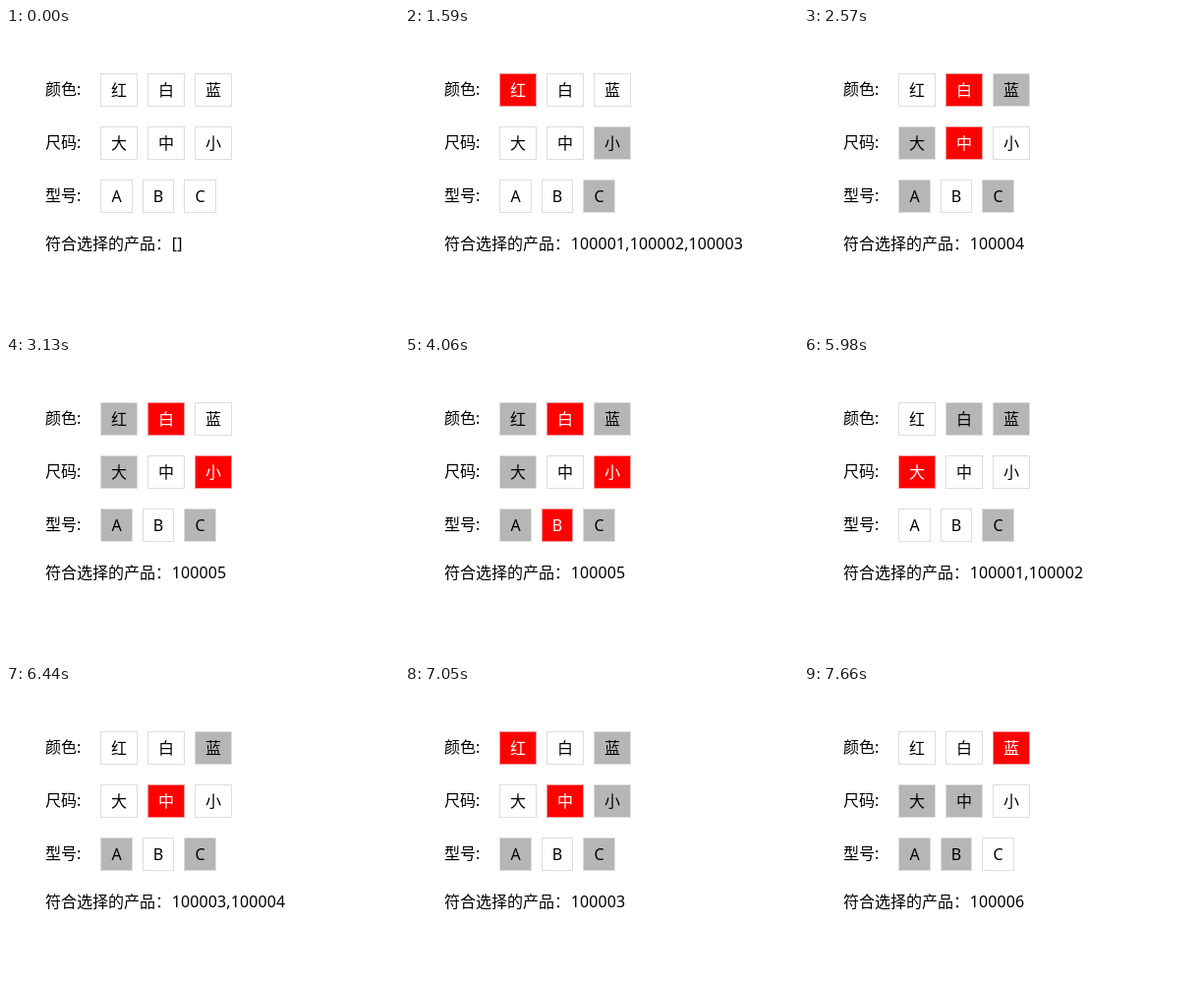
An HTML page that plays this animation: 400x306 px, repeating every 8.58 s.

```html
<!DOCTYPE html>
<html lang="zh-CN">
<head>
<meta charset="utf-8">
<title>规格选择</title>
<style>
  html, body { margin: 0; width: 100%; height: 100%; overflow: hidden; background: #fff; }
  svg { display: block; width: 400px; height: 306px; }
  text { font: 350 16px "Noto Sans", "Noto Sans CJK SC", sans-serif; fill: #000; }
  .option text { text-anchor: middle; }
  #result { letter-spacing: .1px; }
  rect { fill: #fff; stroke: #ddd; }
  .disabled rect { fill: #b6b6b6; }
  .selected rect { fill: #f00; stroke: #e99; }
  .selected text { fill: #fff; }
</style>
</head>
<body>
<svg id="stage" viewBox="0 0 400 306">
  <text x="40" y="225">符合选择的产品：</text>
  <text id="result" x="168.8" y="225">[]</text>
</svg>
<script>
const LOOP = 8580;
const groups = [
  { label: '颜色:', options: ['红', '白', '蓝'], widths: [38, 38, 38] },
  { label: '尺码:', options: ['大', '中', '小'], widths: [38, 38, 38] },
  { label: '型号:', options: ['A', 'B', 'C'], widths: [33, 32, 33] }
];
const products = ['红大A', '红大B', '红中B', '白中B', '白小B', '蓝小C']
  .map((specs, i) => ({ id: 100001 + i, specs: [...specs] }));
const clicks = [
  [1590, '红'], [2150, '白'], [2570, '中'], [3130, '小'], [4060, 'B'],
  [4580, '大'], [6350, '中'], [7000, '红'], [7610, '蓝']
];

const stage = document.getElementById('stage');
const result = document.getElementById('result');

function add(parent, tag, attrs, text = '') {
  const node = document.createElementNS('http://www.w3.org/2000/svg', tag);
  for (const key in attrs) node.setAttribute(key, attrs[key]);
  node.textContent = text;
  return parent.appendChild(node);
}

const buttons = groups.flatMap(({ label, options, widths }, group) => {
  const y = 46 + group * 54;
  let x = 96;
  add(stage, 'text', { x: 40, y: y + 22 }, label);
  return options.map((name, i) => {
    const width = widths[i];
    const node = add(stage, 'g', { class: 'option' });
    add(node, 'rect', { x: x + .5, y: y + .5, width: width - 1, height: 33 });
    add(node, 'text', { x: x + width / 2, y: y + 23 }, name);
    x += width + 10;
    return { node, group, name };
  });
});

const matches = picks => products.filter(({ specs }) =>
  picks.every((pick, i) => !pick || pick === specs[i]));

const withPick = (picks, group, name) =>
  picks.map((pick, i) => i === group ? name : pick);

const isAvailable = (picks, group, name) =>
  matches(withPick(picks, group, name)).length > 0;

// Picking an unavailable option starts a fresh selection.
function choose(picks, name) {
  const group = groups.findIndex(g => g.options.includes(name));
  const base = isAvailable(picks, group, name) ? picks : ['', '', ''];
  return withPick(base, group, name);
}

function render(time) {
  const picks = clicks
    .filter(([at]) => at <= time)
    .reduce((state, [, name]) => choose(state, name), ['', '', '']);
  for (const { node, group, name } of buttons) {
    const state = picks[group] === name ? ' selected'
      : isAvailable(picks, group, name) ? '' : ' disabled';
    node.setAttribute('class', 'option' + state);
  }
  result.textContent = picks.some(Boolean)
    ? matches(picks).map(p => p.id).join(',') : '[]';
}

const start = performance.now();
function tick() {
  render((performance.now() - start) % LOOP);
  requestAnimationFrame(tick);
}
tick();
</script>
</body>
</html>
```
